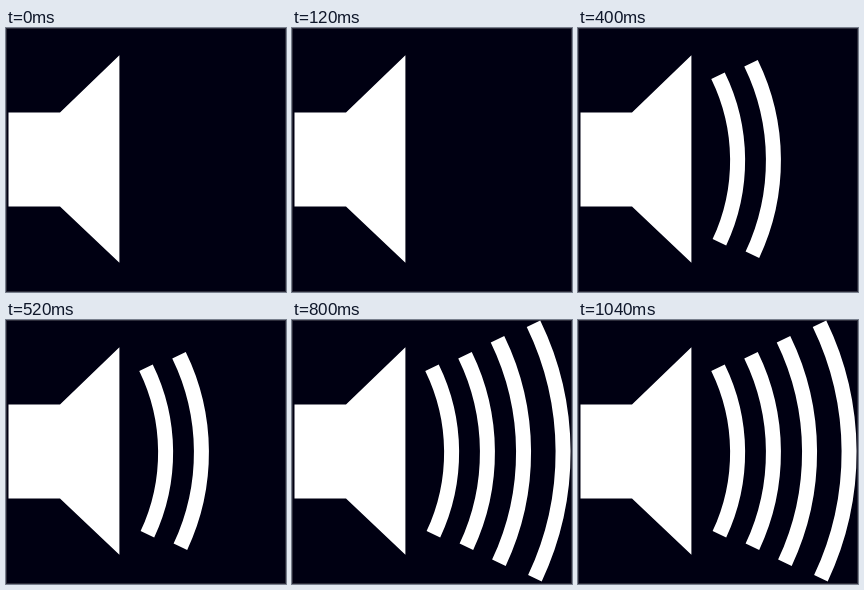
Write an HTML page that moves like this. It is 280 px wide and 264 px high and loops after 1200 ms.

```html
<!DOCTYPE html>
<html lang="en">
<head>
<meta charset="utf-8">
<title>Speaker volume</title>
<style>
  html, body { margin: 0; width: 100%; height: 100%; overflow: hidden; background: #000012; }
  svg { display: block; width: 100vw; height: 100vh; }
  .wave { fill: none; stroke: #fff; stroke-width: 15; }
</style>
</head>
<body>
<svg id="stage" viewBox="0 0 280 264" preserveAspectRatio="none">
  <rect width="280" height="264" fill="#000012"/>
  <rect x=".5" y=".5" width="279" height="263" fill="none" stroke="#2c2c3a"/>
  <path d="M2.5 84.6H54L113.4 27.3V234.7L54 178.6H2.5Z" fill="#fff"/>
</svg>
<script>
  const LOOP = 1200;
  const STEP = 200;
  const MID_Y = 131;
  const BEND = 0.227; // bulge of a wave relative to its half height
  const LEAN = 1.4;   // how far the lower end sits to the right

  // Upper end x and half height of each wave
  const waves = [
    { x: 140, half: 83.3 },
    { x: 173, half: 95.7 },
    { x: 205.5, half: 111.7 },
    { x: 241.5, half: 127.2 }
  ];

  const stage = document.getElementById("stage");

  function arc({ x, half }) {
    const r = half * (1 + BEND * BEND) / (2 * BEND);
    return `M${x} ${MID_Y - half}A${r} ${r} 0 0 1 ${x + LEAN} ${MID_Y + half}`;
  }

  waves.forEach((shape, i) => {
    const wave = document.createElementNS(stage.namespaceURI, "path");
    wave.setAttribute("class", "wave");
    wave.setAttribute("d", arc(shape));
    stage.append(wave);

    // Hidden until its turn, then shown until the loop ends
    wave.animate([
      { opacity: 0, offset: 0, easing: "step-end" },
      { opacity: 1, offset: (i + 1) * STEP / LOOP },
      { opacity: 1, offset: 1 }
    ], { duration: LOOP, iterations: Infinity }).startTime = 0;
  });
</script>
</body>
</html>
```
